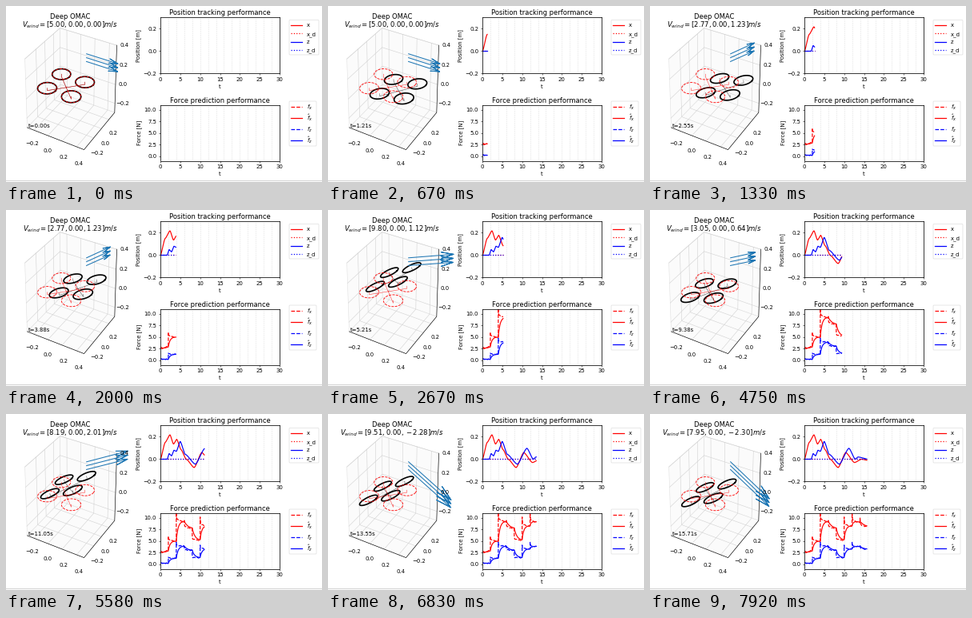
A matplotlib script that plays this animation: 395 by 220 pixels, repeating every 8 s.

```python
import numpy as np
import matplotlib.pyplot as plt
from matplotlib.animation import FuncAnimation
from matplotlib.patches import FancyBboxPatch, Polygon

W, H, DPI = 395, 220, 50
TICK, LOOP, FPS = 50, 8000, 12  # redraw every 50 ms, the flight advances at 12 fps

plt.rcParams.update({"font.family": "DejaVu Sans", "font.size": 9.9,
                     "axes.titlesize": 12.05, "axes.titlepad": 4.5,
                     "axes.linewidth": 1.1})

# ---------- simulated flight ----------
DT, SEG = 0.01, 2.0
T = np.arange(0, 16, DT)
GUST = (T / SEG + 1e-9).astype(int)
WIND = np.array([(5, 0), (2.77, 1.23), (9.80, 1.12), (7.33, -1.91),
                 (3.05, 0.64), (8.19, 2.01), (9.51, -2.28), (7.95, -2.30)])


def eased(keys):
    """Pass through key points, slowing down a little at each."""
    t, v = np.array(keys).T
    k = np.clip(np.searchsorted(t, T, "right") - 1, 0, len(t) - 2)
    f = (T - t[k]) / (t[k + 1] - t[k])
    f = 0.4 * f + 0.6 * f * f * (3 - 2 * f)
    return v[k] + (v[k + 1] - v[k]) * f


def lagged(force, tau=0.55):
    out = force.copy()
    for k in range(1, len(force)):
        out[k] = out[k - 1] + (force[k] - out[k - 1]) * DT / tau
    return out


pos_x = eased([(0, 0), (1.2, .15), (2.4, .218), (3.3, .135), (4.1, .178), (5.2, .085),
               (6.5, 0), (8.5, -.075), (10.4, .06), (12.6, -.03), (14.4, 0), (16, -.01)])
pos_z = eased([(0, 0), (1.7, 0), (2.2, .05), (2.8, .03), (3.4, .08), (4, .07), (5, .158),
               (6.2, .045), (8.8, -.045), (11.2, .098), (12.8, 0), (13.5, .02), (16, 0)])

since = T - SEG * GUST
takeoff = np.where(T < SEG, 0.36 + 0.06 * T, 1)
drag = (3.3 + 0.6 * WIND[GUST, 0]) * takeoff
burst = 1 + 0.08 * np.exp(-since / 0.7) + 0.15 * np.exp(-since / 0.05)
force_x = drag * burst + 0.07 * np.sin(9 * T)
force_z = np.maximum(0.62 * drag - 1.8, 0.2) * burst + 0.07 * np.sin(9 * T)
pred_x, pred_z = lagged(force_x), lagged(force_z)

# ---------- 3D view ----------
LO, HI = np.array([-.3, -.44, -.3]), np.array([.5, .36, .4])
RIGHT = np.array([.866, .5, 0])
UP = np.array([-.25, .433, .866])
EYE = np.array([.433, -.75, .5])


def proj(p):
    q = (np.asarray(p, float) - LO) / (HI - LO) - 0.5
    depth = 1 - q @ EYE / 10
    return np.stack([82 + 82 * (q @ RIGHT) / depth,
                     101 - 98 * (q @ UP) / depth], -1)


def drone(center, pitch):
    """Rotor rings and frame lines, projected to pixels."""
    arm, radius, post = 0.17, 0.117, 0.025
    c, s = np.cos(pitch), np.sin(pitch)
    rot = np.array([[c, 0, -s], [0, 1, 0], [s, 0, c]])
    place = lambda pts: proj(np.asarray(pts) @ rot.T + center)
    a = np.linspace(0, 2 * np.pi, 60)
    ring = np.c_[radius * np.cos(a), radius * np.sin(a), 0 * a + post]
    gap = [[np.nan] * 2]
    rings, frame = [], []
    for sx in (-1, 1):
        for sy in (-1, 1):
            hub = np.array([sx * arm, sy * arm, 0])
            rings += [place(ring + hub), gap]
            frame += [place([[0, 0, 0], hub, hub + [0, 0, post]]), gap]
    return np.vstack(rings), np.vstack(frame)


def arrows(vx, vz):
    step = np.array([0.195 * np.sqrt(vx), 0, 0.165 * np.sign(vz) * np.sqrt(abs(vz))])
    out = []
    for z in (0.14, 0.18, 0.22):
        base = np.array([0.085, 0.36, z])
        tail, tip = proj([base, base + step])
        back = 0.28 * (tail - tip)
        out += [tail, tip]
        for ang in (0.25, -0.25):
            c, s = np.cos(ang), np.sin(ang)
            out += [tip + [c * back[0] - s * back[1], s * back[0] + c * back[1]], tip]
        out.append([np.nan, np.nan])
    return np.array(out)


fig = plt.figure(figsize=(W / DPI, H / DPI), dpi=DPI, facecolor="white")
stage = fig.add_axes([0, 0, 1, 1], xlim=(0, W), ylim=(H, 0))
stage.axis("off")


def path(pts, **style):
    pts = np.asarray(pts)
    return stage.plot(pts[:, 0], pts[:, 1], **style)[0]


def draw_box():
    (x0, y0, z0), (x1, y1, z1) = LO, HI
    for corners in ([[x0, y0, z0], [x0, y1, z0], [x0, y1, z1], [x0, y0, z1]],
                    [[x0, y1, z0], [x1, y1, z0], [x1, y1, z1], [x0, y1, z1]],
                    [[x0, y0, z0], [x1, y0, z0], [x1, y1, z0], [x0, y1, z0]]):
        stage.add_patch(Polygon(proj(corners), fc="0.985", ec="0.88", lw=0.8))
    grid = dict(color="0.82", lw=0.8)
    for k, v in enumerate((-.2, 0, .2, .4)):
        path(proj([[v, y0, z0], [v, y1, z0], [v, y1, z1]]), **grid)
        path(proj([[x0, y0, v], [x0, y1, v], [x1, y1, v]]), **grid)
        label = f"{v:.1f}".replace("-", "\u2212")
        spots = [(33 + 19.4 * k, 172.5 + 8.3 * k), proj([x1, y1, v]) + [9.5, 0]]
        if v < y1:
            path(proj([[x1, v, z0], [x0, v, z0], [x0, v, z1]]), **grid)
            spots.append((114 + 10 * k, 184 - 12.5 * k))
        for x, y in spots:
            stage.text(x, y, label, ha="center", va="center")
    path(proj([[x0, y0, z0], [x1, y0, z0], [x1, y1, z0], [x1, y1, z1]]),
         color="black", lw=0.9)


def draw_legend(top, bottom, right, first, step, entries):
    stage.add_patch(FancyBboxPatch((355, top + 1), right - 356, bottom - top - 2,
                                   boxstyle="round,pad=1", fc="white", ec="0.87", lw=1))
    for k, (label, color, ls) in enumerate(entries):
        y = first + step * k
        path([[356, y], [370, y]], color=color, ls=ls, lw=1.8)
        stage.text(376, y + 2.5, label, va="baseline")


def chart(top, height, title, ylabel, ylim, yticks):
    ax = fig.add_axes([193 / W, 1 - (top + height) / H, 149 / W, height / H])
    ax.set(xlim=(0, 30), ylim=ylim, xticks=range(0, 31, 5), yticks=yticks,
           xlabel="t", ylabel=ylabel, title=title)
    for t in range(2, 30, 2):
        ax.axvline(t, color="0.8", lw=0.9, ls=":")
    return ax


draw_box()
path([[0, 218.5], [W, 218.5]], color="0.82", lw=1.4)
draw_legend(17.5, 61, 391, 24, 10.4, [("x", "red", "-"), ("x_d", "red", ":"),
                                      ("z", "blue", "-"), ("z_d", "blue", ":")])
draw_legend(119, 175, 388, 126.5, 14, [("$f_x$", "red", "--"), (r"$\hat{f}_x$", "red", "-"),
                                       ("$f_z$", "blue", "--"), (r"$\hat{f}_z$", "blue", "-")])

frame_line = path([[0, 0]], color="0.35", lw=0.8)
ring_line = path([[0, 0]], color="black", lw=2.4)
goal_rings, goal_frame = drone(np.zeros(3), 0)
path(goal_frame, color="red", lw=0.8, alpha=0.75)
path(goal_rings, color="red", lw=1.2, ls="--")
wind_line = path([[0, 0]], color="#1f77b4", lw=1.5)
clock = stage.text(27.5, 151.8, "", va="baseline")
stage.text(80, 15.9, "Deep OMAC", ha="center", va="baseline", size=12.05)
wind_text = stage.text(80, 26.2, "", ha="center", va="baseline", size=12.2)

pos_ax = chart(14.5, 70, "Position tracking performance", "Position [m]",
               (-.2, .3), [-.2, 0, .2])
force_ax = chart(124, 69.5, "Force prediction performance", "Force [N]",
                 (-1, 11), [0, 2.5, 5, 7.5, 10])

traces = []
for ax, data, color, ls in [
        (pos_ax, pos_x, "red", "-"), (pos_ax, 0 * T, "red", ":"),
        (pos_ax, pos_z, "blue", "-"), (pos_ax, 0 * T, "blue", ":"),
        (force_ax, force_x, "red", "--"), (force_ax, pred_x, "red", "-"),
        (force_ax, force_z, "blue", "--"), (force_ax, pred_z, "blue", "-")]:
    traces.append((ax.plot([], [], color=color, ls=ls, lw=1.7)[0], data))


def update(k):
    # the offset makes a step show on the tick that contains its start
    i = int((k * TICK + 34) * FPS / 1000)
    t = max(0.0, round(i / FPS * 2, 2) - 0.12)
    n = int(round(t / DT))
    for line, data in traces:
        line.set_data(T[:n + 1], data[:n + 1])

    pitch = 0.042 * pred_x[n] * min(1, t / 0.4)
    rings, frame = drone(np.array([pos_x[n], 0, pos_z[n]]), pitch)
    ring_line.set_data(rings.T)
    frame_line.set_data(frame.T)

    vx, vz = WIND[GUST[n]]
    wind_line.set_data(arrows(vx, vz).T)
    wind_text.set_text(f"$V_{{wind}} = [{vx:.2f}, 0.00, {vz:.2f}]m/s$")
    clock.set_text(f"t={t:.2f}s")
    return []


anim = FuncAnimation(fig, update, frames=LOOP // TICK, interval=TICK,
                     init_func=lambda: update(0), repeat=True, repeat_delay=0, blit=False)
plt.show()
```
